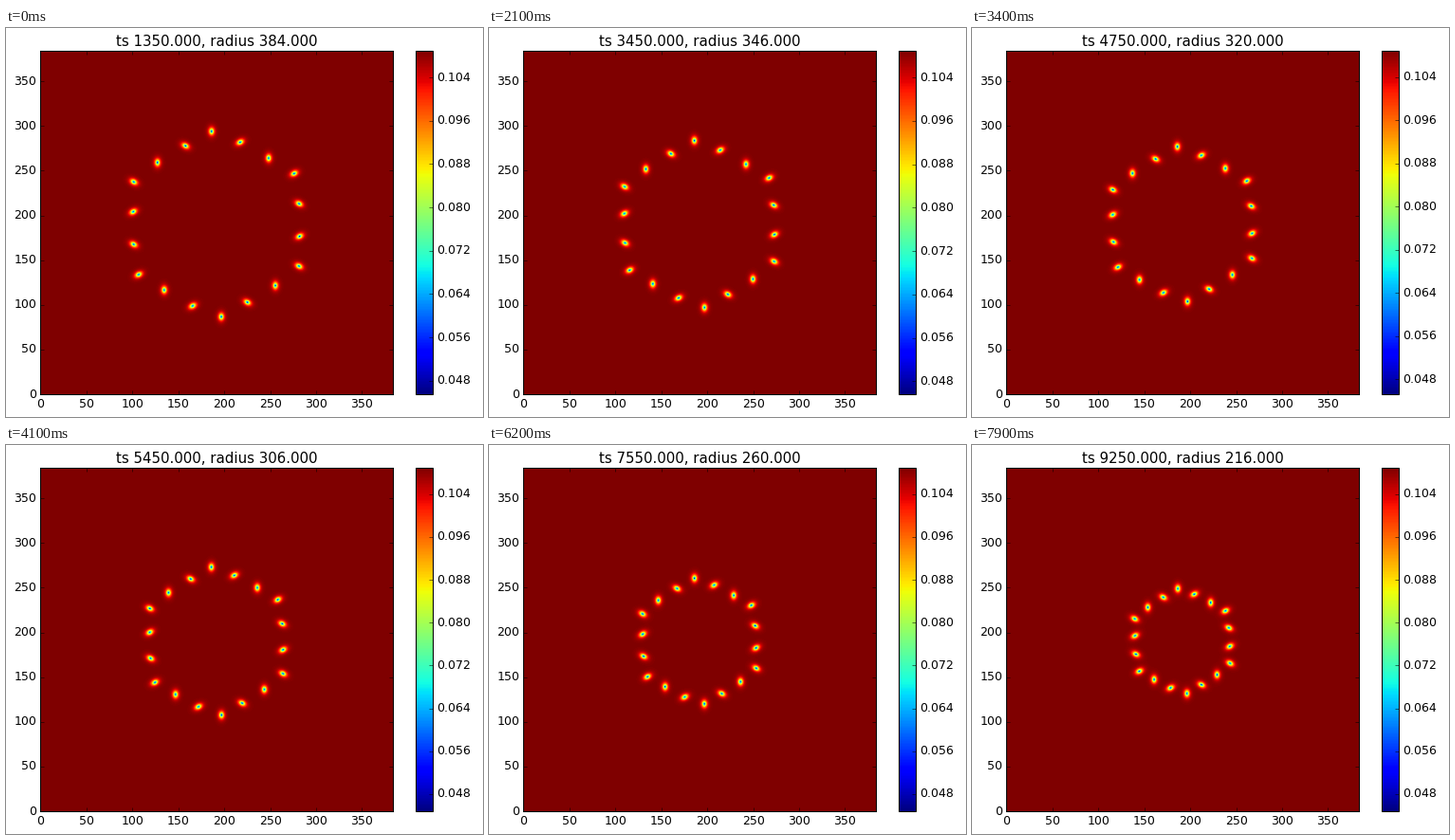
Write a matplotlib script that moves like this. It is 503x410 px and loops after 8 s.

```python
import numpy as np
import matplotlib.pyplot as plt
from matplotlib.animation import FuncAnimation
from matplotlib.ticker import FormatStrFormatter, MultipleLocator

W, H, DPI = 503, 410, 64
FRAMES, STEP_MS = 80, 100
PT = 75 / DPI  # font and line sizes follow a 75 dpi layout

LEFT, TOP, WIDTH, HEIGHT = 36.4, 24.1, 372, 361.9
N = 384
CENTER = np.array([191.4, 189.8])
PER_PIXEL = np.array([N / WIDTH, N / HEIGHT])
VMAX = 0.1089

# One sixth of the ring: distance per unit radius, direction, tilt (degrees).
SECTOR = [(0.252, 93, 90), (0.2314, 73.8, 30), (0.2285, 51.6, 90)]

plt.rcParams.update({"font.family": "DejaVu Sans", "font.size": 12 * PT,
                     "axes.linewidth": PT, "ytick.alignment": "center"})


def radius(i):
    """The enclosed area shrinks at a slowly falling rate."""
    return np.sqrt(N ** 2 - 1352 * i + 0.967 * i ** 2)


def floor_value(i):
    return np.interp(i, [19, 29, 36], [0.0455, 0.0462, 0.0448])


def defects(r):
    """Position and tilt of each defect; the ring turns as it closes."""
    turn = 2 * (N - r) / 168
    for k in range(6):
        for reach, angle, tilt in SECTOR:
            a = np.radians(angle + turn - 60 * k)
            offset = (r + 4) * reach * np.array([np.cos(a), np.sin(a)])
            yield CENTER + offset * PER_PIXEL, np.radians(tilt - 60 * k)


def field(r, low):
    """Uniform density with a sharp, elongated dip at every defect."""
    drop = np.zeros((N, N))
    for (x, y), tilt in defects(r):
        x0, y0 = int(x) - 20, int(y) - 20
        gy, gx = np.mgrid[y0:y0 + 41, x0:x0 + 41]
        dx, dy = gx - x, gy - y
        u = dx * np.cos(tilt) + dy * np.sin(tilt)
        v = dy * np.cos(tilt) - dx * np.sin(tilt)
        q = np.hypot(u / 1.25, v / 0.88)
        drop[y0:y0 + 41, x0:x0 + 41] += (np.exp(-(q / 2) ** 1.1)
                                         + 0.015 * np.exp(-(q / 7) ** 2))
    return VMAX - (VMAX - low) * drop


def box(left, width):
    return fig.add_axes([left / W, 1 - (TOP + HEIGHT) / H, width / W, HEIGHT / H])


fig = plt.figure(figsize=(W / DPI, H / DPI), dpi=DPI, facecolor="white")
ax = box(LEFT, WIDTH)
cax = box(LEFT + WIDTH * 1.0625, HEIGHT / 20)

image = ax.imshow(np.full((N, N), VMAX), cmap="jet", origin="lower",
                  extent=(0, N, 0, N), aspect="auto", interpolation="bilinear",
                  vmin=floor_value(0), vmax=VMAX)
bar = fig.colorbar(image, cax=cax)
bar.locator = MultipleLocator(0.008)
bar.formatter = FormatStrFormatter("%.3f")
bar.outline.set_linewidth(PT)
ax.set_xticks(range(0, N, 50))
ax.set_yticks(range(0, N, 50))
ticks = dict(direction="in", length=4 * PT, width=0.5 * PT, pad=4 * PT)
ax.tick_params(top=True, right=True, **ticks)
cax.tick_params(**ticks)
title = ax.set_title("", fontsize=14.4 * PT, pad=5 * PT)


def draw(i):
    r, low = radius(i), floor_value(i)
    image.set_data(field(r, low))
    image.set_clim(low, VMAX)
    bar.update_normal(image)
    title.set_text(f"ts {1350 + 100 * i:.3f}, radius {2 * round(r / 2):.3f}")
    return image, title


anim = FuncAnimation(fig, draw, frames=FRAMES, interval=STEP_MS,
                     repeat=True, repeat_delay=0, blit=False)
plt.show()
```
